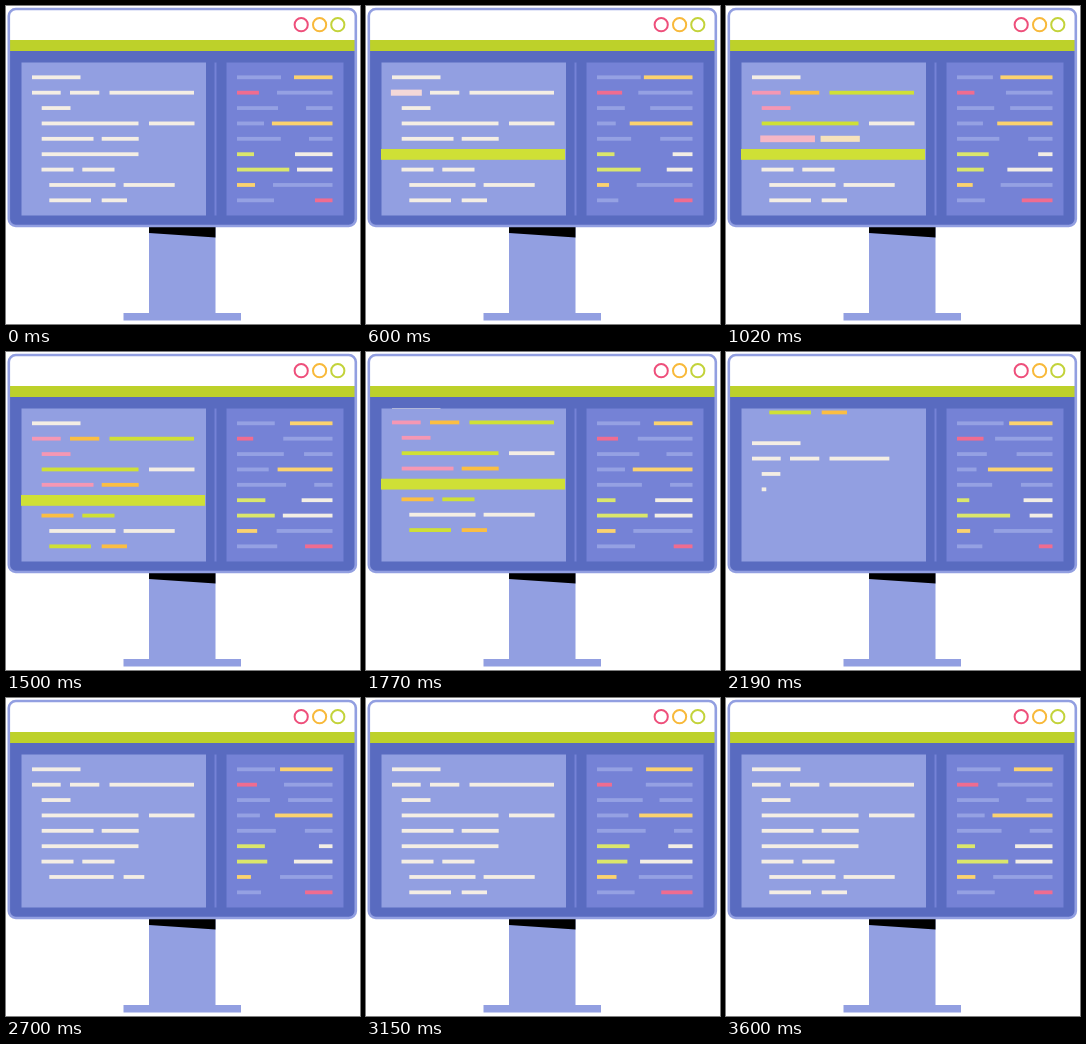
An HTML page for the animation above (3630 ms loop, 354 px wide and 318 px high).

```html
<!DOCTYPE html>
<html lang="en">
<head>
<meta charset="utf-8">
<title>Code editor</title>
<style>
  html, body { margin: 0; width: 100%; height: 100%; overflow: hidden; background: #fff; }
  svg { display: block; width: 354px; height: 318px; }
</style>
</head>
<body>
<svg viewBox="0 0 354 318">
  <defs>
    <clipPath id="screen"><rect x="3" y="3" width="347" height="217" rx="7"/></clipPath>
    <clipPath id="pane"><rect x="15" y="56.5" width="185" height="153"/></clipPath>
  </defs>
  <path d="M143 221h66.5v86H235v7.5H117.5V307H143z" fill="#929fe1"/>
  <path d="M143 221h66.5v10.5L143 227z"/>
  <g clip-path="url(#screen)">
    <rect width="354" height="221" fill="#596bc0"/>
    <rect width="354" height="34" fill="#fff"/>
    <rect y="34" width="354" height="11" fill="#bdd12a"/>
  </g>
  <rect x="2.8" y="3" width="347" height="217" rx="7" fill="none" stroke="#929fe1" stroke-width="2.6"/>
  <g fill="none" stroke-width="2">
    <circle cx="295.2" cy="18.7" r="6.6" stroke="#ee4f7b"/>
    <circle cx="313.6" cy="18.7" r="6.6" stroke="#f8b93a"/>
    <circle cx="331.8" cy="18.7" r="6.6" stroke="#c3d33a"/>
  </g>
  <rect x="15.5" y="56.5" width="184.5" height="153" fill="#929fe1"/>
  <rect x="208.5" y="56.5" width="2" height="153" fill="#7582d6"/>
  <rect x="220.5" y="56.5" width="117" height="153" fill="#7582d6"/>
  <g clip-path="url(#pane)">
    <g id="code">
      <g id="lines"></g>
      <rect id="band" x="15" y="143" height="10.8" fill="#cfe036"/>
    </g>
  </g>
  <g id="side"></g>
</svg>
<script>
const LOOP = 3630, PITCH = 15.38, TOP = 71.3, THICK = 3.8, SHIFT = PITCH * 10;
const CREAM = [244, 238, 228];
const TINT = { p: [245, 151, 180], o: [251, 190, 66], g: [207, 224, 54] };
const SIDE = { v: '#95a1e3', y: '#fbd26f', p: '#f06c90', g: '#dae66c', c: '#f3eee4' };

// per row: start, end, highlight colour
const rows = [
  [[26, 74.5]],
  [[26, 54.7, 'p'], [64, 93.3, 'o'], [103.5, 188, 'g']],
  [[35.7, 64.5, 'p']],
  [[35.7, 132.5, 'g'], [143, 188.5]],
  [[35.7, 87.5, 'p'], [95.7, 132.7, 'o']],
  [[35.7, 132.5]],
  [[35.5, 67.5, 'o'], [76.3, 108.5, 'g']],
  [[43.3, 109.5], [117.6, 168.7]],
  [[43.3, 85, 'g'], [95.7, 121, 'o']]
];

// colours, then mean, cosine and sine parts of the inner end of each bar
const bars = [
  ['vy', 271.8, 3.2, 5.1, 281, 7, .3],
  ['pv', 251.7, 1.2, 5.7, 274.7, -3.7, -4.8],
  ['vv', 268.3, 3.7, -8.8, 291.2, 8.9, -3.1],
  ['vy', 256.2, 1.8, -6.4, 267.6, -1.7, -5.4],
  ['vv', 272.6, 2.2, -7.3, 301.2, 1.8, -7],
  ['gc', 253.8, -5.8, -9.3, 301, -12, -.2],
  ['gc', 271.9, 11.4, 9.5, 288.9, 2.1, 14.7],
  ['yv', 247.1, 1.9, -3.6, 270.6, -3.6, -1.9],
  ['vp', 261.8, 6.2, -7.4, 303.7, 5.3, 8]
];

const $ = id => document.getElementById(id);
const clamp = u => Math.max(0, Math.min(1, u));
const smooth = u => u * u * (3 - 2 * u);
const span = (t, start, dur) => clamp((t - start) / dur);
const rgb = c => `rgb(${c.map(Math.round)})`;

function addRect(parent, fill) {
  const r = document.createElementNS('http://www.w3.org/2000/svg', 'rect');
  r.setAttribute('fill', fill);
  return parent.appendChild(r);
}

function place(r, x, end, y, pad = 0) {
  r.setAttribute('x', x - pad);
  r.setAttribute('width', Math.max(0, end - x + 2 * pad));
  r.setAttribute('y', y - THICK / 2 - pad);
  r.setAttribute('height', THICK + 2 * pad);
}

// cubic-bezier(x1, 0, x2, 1)
function ease(u, x1, x2) {
  let lo = 0, hi = 1;
  for (let i = 0; i < 24; i++) {
    const s = (lo + hi) / 2, q = 1 - s;
    if (3 * q * q * s * x1 + 3 * q * s * s * x2 + s * s * s < u) lo = s; else hi = s;
  }
  return smooth(lo);
}

let tinted = 0;
const segs = rows.flatMap((row, i) => row.map(([x, end, tint]) => ({
  x, end, y: TOP + i * PITCH,
  tint: TINT[tint],
  tintAt: tint ? 555 + 70 * tinted++ : 0,
  old: addRect($('lines'), rgb(CREAM)),
  typed: addRect($('lines'), rgb(CREAM))
})));
segs.forEach((s, k) => {
  s.typeAt = 1884 + 59.5 * k;
  s.typeDur = s.end - s.x > 80 ? 180 : 105;
});

const sideBars = bars.map(([cols]) => [...cols].map(c => addRect($('side'), SIDE[c])));

function draw(t) {
  for (const s of segs) {
    const u = s.tint ? span(t, s.tintAt, 180) : 0;
    place(s.old, s.x, s.end, s.y, 1.6 * Math.sin(Math.PI * u));
    if (s.tint) s.old.setAttribute('fill', rgb(CREAM.map((c, i) => c + (s.tint[i] - c) * u)));
    place(s.typed, s.x, s.x + (s.end - s.x) * span(t, s.typeAt, s.typeDur), s.y + SHIFT);
  }
  $('band').setAttribute('width', 184 * smooth(span(t, 40, 480)));
  const scroll = SHIFT * ease(span(t, 1641, 847), .28, .37);
  $('code').setAttribute('transform', `translate(0 ${-scroll})`);

  const a = 4 * Math.PI * t / LOOP, c = Math.cos(a), s = Math.sin(a);
  bars.forEach(([, m, p, q, n, v, w], i) => {
    const y = TOP + i * PITCH, [left, right] = sideBars[i];
    place(left, 231, m + p * c + q * s, y);
    place(right, n + v * c + w * s, 326.5, y);
  });
}

let begin;
function tick(now) {
  begin ??= now;
  draw((now - begin) % LOOP);
  requestAnimationFrame(tick);
}
draw(0);
requestAnimationFrame(tick);
</script>
</body>
</html>
```
